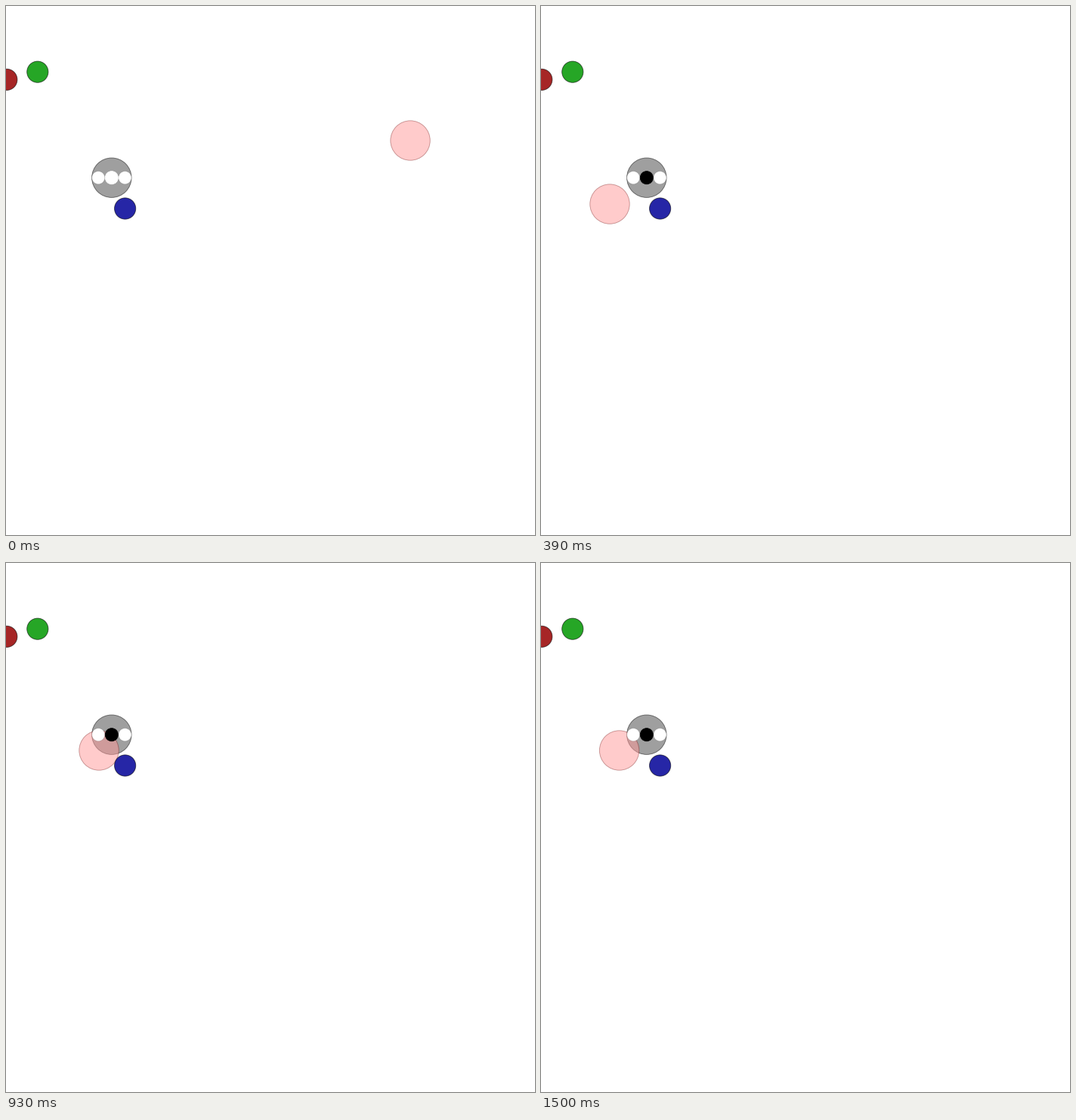
Animation, 700 px wide and 700 px high, one loop 1530 ms. Source, as a matplotlib script:

```python
import numpy as np
import matplotlib.pyplot as plt
from matplotlib.animation import FuncAnimation
from matplotlib.patches import Circle

SIZE, DPI = 700, 100
FRAMES, INTERVAL = 51, 30
HUB_X, HUB_Y, GAP = 139.8, 227.2, 17.6
BIG, SMALL, DOT = 26.2, 14.1, 8.5

fig = plt.figure(figsize=(SIZE / DPI, SIZE / DPI), dpi=DPI, facecolor="white")
ax = fig.add_axes([0, 0, 1, 1])
ax.set_xlim(0, SIZE)
ax.set_ylim(SIZE, 0)
ax.axis("off")


def ramp(i, start, end):
    return float(np.clip((i - start) / (end - start), 0, 1))


def ease(i, start, end):
    s = ramp(i, start, end)
    return s * s * (3 - 2 * s)


def pink_center(i):
    """Steady sweep to the left with a dip, a turn back, then a slow drift."""
    x = (535 - 444 * ramp(i, 0, 13) + 34 * ease(i, 13, 22)
         - 2 * ramp(i, 22, 31) - 17.4 * ease(i, 31, 43) - 2 * ramp(i, 43, 50))
    y = (178 + 89 * ease(i, 4, 14.5) - 18 * ease(i, 14.5, 22)
         - ramp(i, 22, 31))
    return x, y


def disc(x, y, r, fill, edge, z):
    patch = Circle((x, y), r, facecolor=fill, edgecolor=edge,
                   linewidth=0.65, zorder=z)
    return ax.add_patch(patch)


disc(HUB_X, HUB_Y, BIG, "#9f9f9f", (0, 0, 0, 0.5), 1)
pink = disc(*pink_center(0), BIG, (1, 0.6, 0.6, 0.5), (0.4, 0, 0, 0.36), 2)

for x, y, color in ((0.8, 97.4, "#a62626"), (41.8, 87.2, "#26a626"),
                    (157.6, 268, "#2626a6")):
    disc(x, y, SMALL, color, (0, 0, 0, 0.6), 3)

for side in (-1, 1):
    disc(HUB_X + side * GAP, HUB_Y, DOT, "white", (0, 0, 0, 0.12), 4)
middle = disc(HUB_X, HUB_Y, DOT, "white", "white", 5)


def update(i):
    pink.center = pink_center(i)
    middle.set_color("white" if i == 0 else "black")
    return pink, middle


anim = FuncAnimation(fig, update, frames=FRAMES, interval=INTERVAL,
                     repeat=True, repeat_delay=0, blit=False)
plt.show()
```
